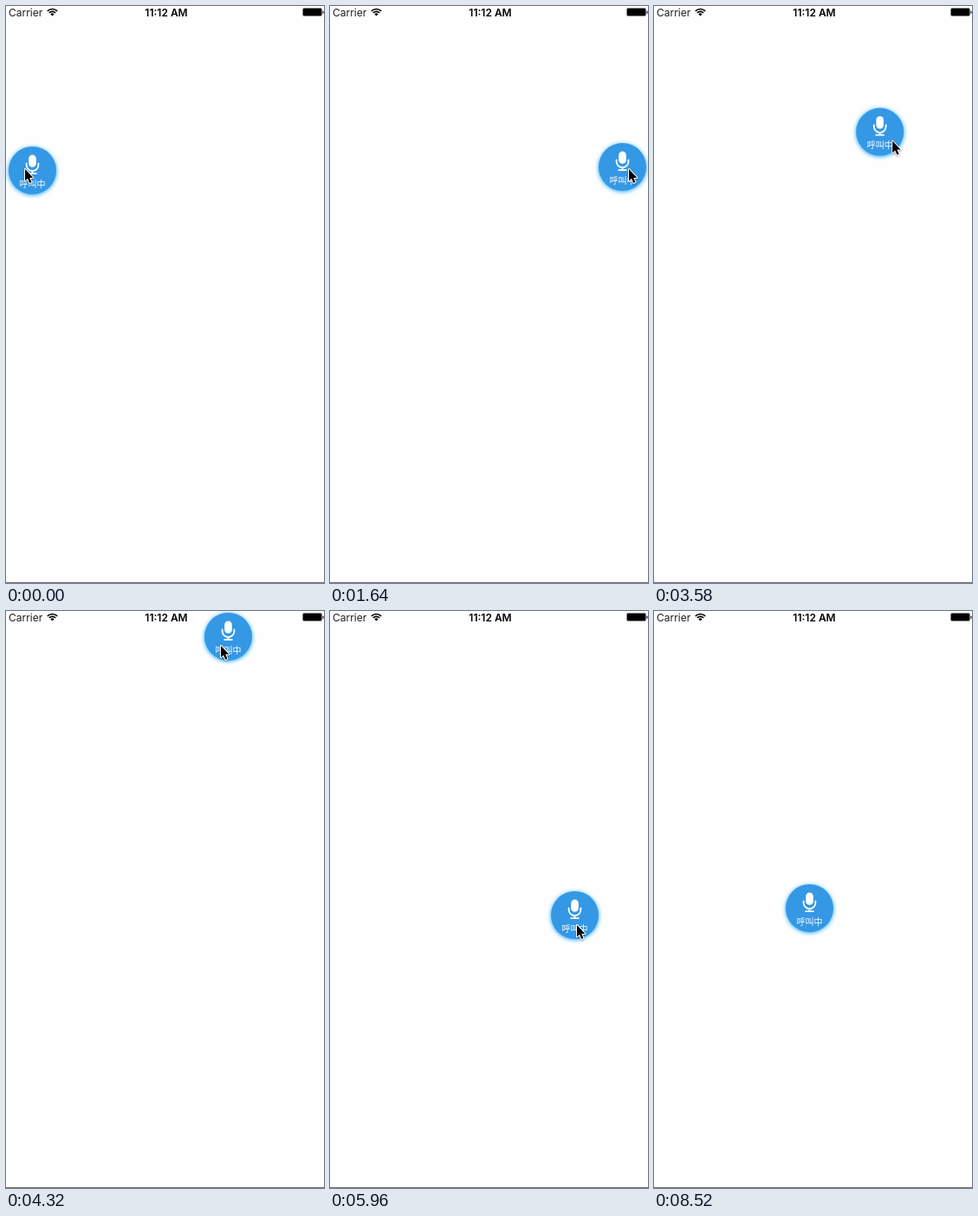
Recreate the animation shown at these times as an HTML page with a canvas. Size 367 by 665 pixels, loop 8600 ms.

```html
<!DOCTYPE html>
<html lang="zh-CN">
<head>
<meta charset="utf-8">
<title>Floating call button</title>
<style>
  html, body { margin: 0; width: 100%; height: 100%; overflow: hidden; background: #fefefe; }
  canvas { display: block; width: 367px; height: 665px; }
</style>
</head>
<body>
<canvas id="stage"></canvas>
<script>
const W = 367, H = 665, LOOP = 8600, STEP = 149;
const HOME = [30.5, 189.5], REST = [179.5, 342.5];
const POINTER_END = 53;

const canvas = document.getElementById('stage');
const ctx = canvas.getContext('2d');
const ratio = window.devicePixelRatio || 1;
canvas.width = W * ratio;
canvas.height = H * ratio;

// Each drag curves the button to `end`; `grip` is where the pointer holds it.
const DRAGS = [
  { from: 0, to: 5, bend: [170, 177], end: [337.5, 185.5], grip: [-8.5, -1.5] },
  { from: 11, to: 15, bend: [295, 400], end: [257.5, 628.5], grip: [7.5, 2.5] },
  { from: 18, to: 27, bend: [270, 330], end: [256.5, 29.5], grip: [14.5, 10.5] },
  { from: 29, to: 36, bend: [255, 210], end: [173.5, 440.5], grip: [-8.5, 10.5] },
  { from: 36, to: 40, bend: [230, 415], end: [282.5, 350.5], grip: [2.5, 11.5] },
  { from: 40, to: 44, bend: [118, 254], end: REST, grip: [2.5, 11.5] },
  // The pointer lets go and leaves.
  { from: 45, to: 47, bend: REST, end: REST, grip: [-21.5, 20.5] },
  { from: 49, to: 51, bend: REST, end: REST, grip: [19.5, 29.5] },
  { from: 52, to: 53, bend: REST, end: REST, grip: [142.5, 132.5] }
];
DRAGS.forEach((d, i) => d.start = i ? DRAGS[i - 1].end : HOME);

const clamp = v => Math.min(1, Math.max(0, v));
const easeOut = u => 1 - (1 - u) ** 1.5;
const mix = (a, b, p) => a.map((v, i) => v + (b[i] - v) * p);

function pose(k) {
  const i = DRAGS.findLastIndex(d => d.from <= k);
  const drag = DRAGS[i], next = DRAGS[i + 1] || drag;
  const p = easeOut(clamp((k - drag.from) / (drag.to - drag.from)));
  const ball = mix(mix(drag.start, drag.bend, p), mix(drag.bend, drag.end, p), p);
  const glide = k > drag.to ? (k - drag.to) / (next.from - drag.to) : 0;
  const grip = mix(drag.grip, next.grip, clamp(glide));
  return { ball, tip: [ball[0] + grip[0], ball[1] + grip[1]] };
}

function label(text, x, y, font, color, align) {
  ctx.font = font;
  ctx.fillStyle = color;
  ctx.textAlign = align;
  ctx.fillText(text, x, y);
}

function box(x, y, w, h, r, color) {
  ctx.fillStyle = color;
  ctx.beginPath();
  ctx.roundRect(x, y, w, h, r);
  ctx.fill();
}

function statusBar() {
  label('Carrier', 3, 11.5, '12px Inter, Roboto, sans-serif', '#1c1c1c', 'left');
  label('11:12 AM', 185, 11.5, '600 12px Inter, Roboto, sans-serif', '#000', 'center');

  const left = -Math.PI * 0.75, right = -Math.PI * 0.25;
  ctx.strokeStyle = ctx.fillStyle = '#000';
  ctx.lineWidth = 1.7;
  for (const r of [8, 5.1]) {
    ctx.beginPath();
    ctx.arc(53.5, 11.5, r, left, right);
    ctx.stroke();
  }
  ctx.beginPath();
  ctx.moveTo(53.5, 11.5);
  ctx.arc(53.5, 11.5, 3, left, right);
  ctx.fill();

  ctx.strokeStyle = '#888';
  ctx.lineWidth = 1;
  ctx.beginPath();
  ctx.roundRect(342.5, 2.5, 22, 9, 1.5);
  ctx.stroke();
  box(343, 3, 21, 8, 0.8, '#000');
  box(365.2, 5.4, 1.4, 3.6, 0.7, '#333');
}

function microphone() {
  box(-4.3, -18, 8.6, 14.3, 4.3, '#fff');
  ctx.strokeStyle = '#fff';
  ctx.lineCap = 'round';
  ctx.lineWidth = 1.8;
  ctx.beginPath();
  ctx.moveTo(-6.9, -8);
  ctx.lineTo(-6.9, -6.2);
  ctx.arc(0, -6.2, 6.9, Math.PI, 0, true);
  ctx.lineTo(6.9, -8);
  ctx.moveTo(0, 0.7);
  ctx.lineTo(0, 3.6);
  ctx.moveTo(-4.4, 3.6);
  ctx.lineTo(4.4, 3.6);
  ctx.stroke();
}

function button(x, y) {
  ctx.save();
  ctx.translate(x, y);
  ctx.save();
  ctx.shadowColor = '#17a5ff';
  ctx.shadowBlur = 5.5 * ratio;
  ctx.shadowOffsetY = 0.9 * ratio;
  ctx.fillStyle = '#3498e5';
  ctx.beginPath();
  ctx.arc(0, 0, 27.5, 0, Math.PI * 2);
  ctx.fill();
  ctx.restore();
  microphone();
  label('呼叫中', 0, 19, '10px "Noto Sans CJK SC", "Noto Sans CJK", "Noto Sans CJK JP", sans-serif', '#fff', 'center');
  ctx.restore();
}

function pointer(x, y) {
  const arrow = new Path2D('M0 0V13.6L3 10.8L5.3 16L7.5 15L5.2 9.9H9.4Z');
  ctx.save();
  ctx.translate(x, y);
  ctx.save();
  ctx.shadowColor = 'rgba(0,0,0,.35)';
  ctx.shadowBlur = 2 * ratio;
  ctx.shadowOffsetY = ratio;
  ctx.strokeStyle = '#fff';
  ctx.lineWidth = 2;
  ctx.lineJoin = 'round';
  ctx.stroke(arrow);
  ctx.restore();
  ctx.fillStyle = '#000';
  ctx.fill(arrow);
  ctx.restore();
}

function draw(t) {
  // The picture advances in even steps; the small lead absorbs rounding.
  const k = Math.floor((t + 6) / STEP);
  const { ball, tip } = pose(k);
  ctx.setTransform(ratio, 0, 0, ratio, 0, 0);
  ctx.fillStyle = '#fefefe';
  ctx.fillRect(0, 0, W, H);
  statusBar();
  ctx.fillStyle = '#707070';
  ctx.fillRect(0, H - 1, W, 1);
  button(...ball);
  if (k < POINTER_END) pointer(...tip);
}

const start = performance.now();
function frame() {
  draw((performance.now() - start) % LOOP);
  requestAnimationFrame(frame);
}
frame();
</script>
</body>
</html>
```
